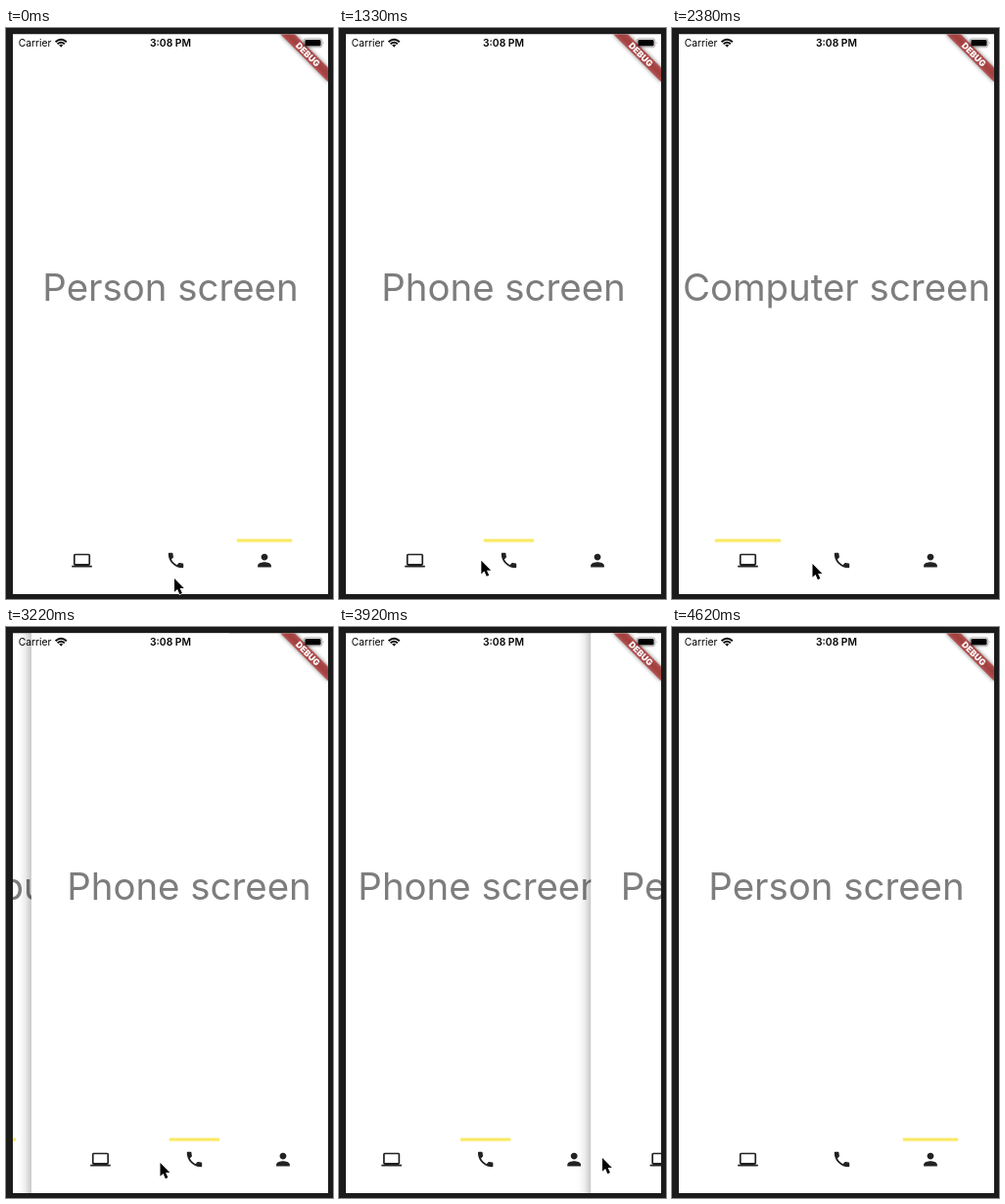
An HTML page for the animation above (5320 ms loop, 334 by 584 pixels).

```html
<!DOCTYPE html>
<html lang="en">
<head>
<meta charset="utf-8">
<title>Page transitions</title>
<style>
  html, body { margin: 0; width: 100%; height: 100%; overflow: hidden; background: #1b1b1b; }
  svg { display: block; width: 100vw; height: 100vh; }
  text { font-family: Inter, "Open Sans", sans-serif; text-anchor: middle; }
</style>
</head>
<body>
<svg viewBox="0 0 334 584">
  <defs>
    <clipPath id="screen"><rect x="7" y="6.5" width="322" height="572.5"/></clipPath>
    <linearGradient id="edge">
      <stop offset="0" stop-opacity="0"/>
      <stop offset=".3" stop-opacity=".016"/>
      <stop offset=".6" stop-opacity=".07"/>
      <stop offset="1" stop-opacity=".22"/>
    </linearGradient>
    <filter id="soft" x="-20%" y="-100%" width="140%" height="300%"><feGaussianBlur stdDeviation="2.2"/></filter>
    <path id="laptop" d="M20 18c1.1 0 1.99-.9 1.99-2L22 6c0-1.1-.9-2-2-2H4c-1.1 0-2 .9-2 2v10c0 1.1.9 2 2 2H0v2h24v-2h-4zM4 6h16v10H4V6z"/>
    <path id="phone" d="M6.62 10.79c1.44 2.83 3.76 5.14 6.59 6.59l2.2-2.2c.27-.27.67-.36 1.02-.24 1.12.37 2.33.57 3.57.57.55 0 1 .45 1 1V20c0 .55-.45 1-1 1-9.39 0-17-7.61-17-17 0-.55.45-1 1-1h3.5c.55 0 1 .45 1 1 0 1.25.2 2.45.57 3.57.11.35.03.74-.25 1.02l-2.2 2.2z"/>
    <path id="person" d="M12 12c2.21 0 4-1.79 4-4s-1.79-4-4-4-4 1.79-4 4 1.79 4 4 4zm0 2c-2.67 0-8 1.34-8 4v2h16v-2c0-2.66-5.33-4-8-4z"/>
    <g id="nav" fill="#222">
      <use href="#laptop" transform="translate(67.2 534.2) scale(.859)"/>
      <use href="#phone" transform="translate(163.2 534.2) scale(.859)"/>
      <use href="#person" transform="translate(253.7 534.2) scale(.859)"/>
    </g>
  </defs>

  <rect width="334" height="584" fill="#1b1b1b"/>
  <rect x="7" y="6.5" width="322" height="572.5" fill="#fff"/>

  <g clip-path="url(#screen)">
    <g id="pages"></g>

    <g transform="translate(329 6.5) rotate(45)">
      <rect x="-34.4" y="24" width="68.8" height="10.4" opacity=".5" filter="url(#soft)"/>
      <rect x="-36" y="24" width="72" height="10.4" fill="#b71c1c" fill-opacity=".627"/>
      <text y="32.4" font-size="8.8" font-weight="900" fill="#fff">DEBUG</text>
    </g>

    <text x="29.5" y="19" font-size="10.3">Carrier</text>
    <text x="168" y="19" font-size="10.3" font-weight="600">3:08 PM</text>
    <g fill="none" stroke="#000" stroke-width="1.9">
      <path d="M50.6 14.2Q56.2 9.2 61.8 14.2M52.6 16.4Q56.2 13.2 59.8 16.4"/>
      <path d="M54.2 17.6Q56.2 16 58.2 17.6L56.2 19.8Z" fill="#000" stroke="none"/>
    </g>
    <rect x="304.2" y="10.8" width="18.6" height="9" rx="2.4" fill="none" stroke="#000" stroke-opacity=".4" stroke-width=".8"/>
    <rect x="305.4" y="12" width="16.2" height="6.6" rx="1.4"/>
    <path d="M323.8 13.8q1.4 1.5 0 3z" fill-opacity=".45"/>
  </g>

  <circle id="ring" r="21.7" fill="none" stroke="#000" stroke-opacity=".6" stroke-width="1.5"/>
  <path id="cursor" d="M0 0V13.8L3.1 10.9 5.4 16.2 7.9 15.1 5.6 10H9.8Z"
        stroke="#fff" stroke-width="1.4" stroke-linejoin="round" paint-order="stroke"/>
</svg>

<script>
const LOOP = 5320, STEP = 70, WIDTH = 322, SLIDE = 400;
const $ = id => document.getElementById(id);

const screens = {
  laptop: { title: "Computer screen", x: 44, w: 67 },
  phone: { title: "Phone screen", x: 148, w: 51 },
  person: { title: "Person screen", x: 236, w: 56 }
};

// begin: animation start; show: first moment it is painted
const slides = [
  { begin: 620, show: 770, from: "person", to: "phone" },
  { begin: 1594, show: 1594, from: "phone", to: "laptop" },
  { begin: 3000, show: 3150, from: "laptop", to: "phone" },
  { begin: 3886, show: 3886, from: "phone", to: "person" }
];

const clicks = [[490, 630], [1470, 1610], [2240, 2380], [2870, 3010], [3780, 3920]];

// time, x, y of the pointer tip
const track = [
  [0, 172, 563], [350, 172, 543], [1260, 172, 543], [1470, 92, 548],
  [2030, 92, 548], [2240, 143.5, 548], [2800, 143.5, 548], [2870, 155.5, 548],
  [2940, 157.5, 548], [3290, 157.5, 548], [3500, 213, 548], [3710, 269, 543],
  [4200, 269, 543], [4620, 289, 592]
];

for (const [id, s] of Object.entries(screens)) {
  $("pages").insertAdjacentHTML("beforeend", `
    <g id="page-${id}">
      <rect class="edge" x="-9.1" y="6" width="16.1" height="574" fill="url(#edge)"/>
      <rect x="7" y="6" width="${WIDTH}" height="574" fill="#fff"/>
      <text x="168" y="279" font-size="38.4" fill="#7d7d7d">${s.title}</text>
      <rect x="${s.x - .5}" y="522" width="${s.w + 1}" height="4.4" rx="1.5" fill="#fbf3a6" opacity=".7"/>
      <rect x="${s.x}" y="523" width="${s.w}" height="2.4" fill="#f9ea62"/>
      <use href="#nav"/>
    </g>`);
  s.node = $("page-" + id);
}

const bez = (s, a, b) => 3 * (1 - s) ** 2 * s * a + 3 * (1 - s) * s * s * b + s ** 3;

// cubic-bezier(.35, .91, .33, .97)
function ease(p) {
  if (p >= 1) return 1;
  let lo = 0, hi = 1;
  for (let i = 0; i < 24; i++) {
    const mid = (lo + hi) / 2;
    if (bez(mid, .35, .33) < p) lo = mid; else hi = mid;
  }
  return bez(lo, .91, .97);
}

function pointer(t) {
  const i = track.findIndex(k => k[0] > t);
  if (i < 0) return null;
  const [t0, x0, y0] = track[i - 1], [t1, x1, y1] = track[i];
  const p = (t - t0) / (t1 - t0);
  return [x0 + (x1 - x0) * p, y0 + (y1 - y0) * p];
}

function place(node, x) {
  node.style.display = "";
  node.setAttribute("transform", `translate(${x.toFixed(2)} 0)`);
  node.parentNode.appendChild(node);
}

function draw(t) {
  for (const s of Object.values(screens)) s.node.style.display = "none";
  const slide = slides.filter(s => t >= s.show).pop();
  const p = slide ? ease((t - slide.begin) / SLIDE) : 1;
  if (p < 1) place(screens[slide.from].node, -WIDTH / 3 * p);
  place(screens[slide ? slide.to : "person"].node, WIDTH * (1 - p));

  const tip = pointer(t);
  const down = clicks.some(([a, b]) => t >= a && t < b);
  $("cursor").style.display = tip ? "" : "none";
  $("ring").style.display = tip && down ? "" : "none";
  if (tip) {
    const move = `translate(${tip[0]} ${tip[1]})`;
    $("cursor").setAttribute("transform", move);
    $("ring").setAttribute("transform", move);
  }
}

const origin = performance.now();
function tick() {
  const t = (performance.now() - origin) % LOOP;
  draw(Math.floor(t / STEP) * STEP);
  requestAnimationFrame(tick);
}
tick();
</script>
</body>
</html>
```
